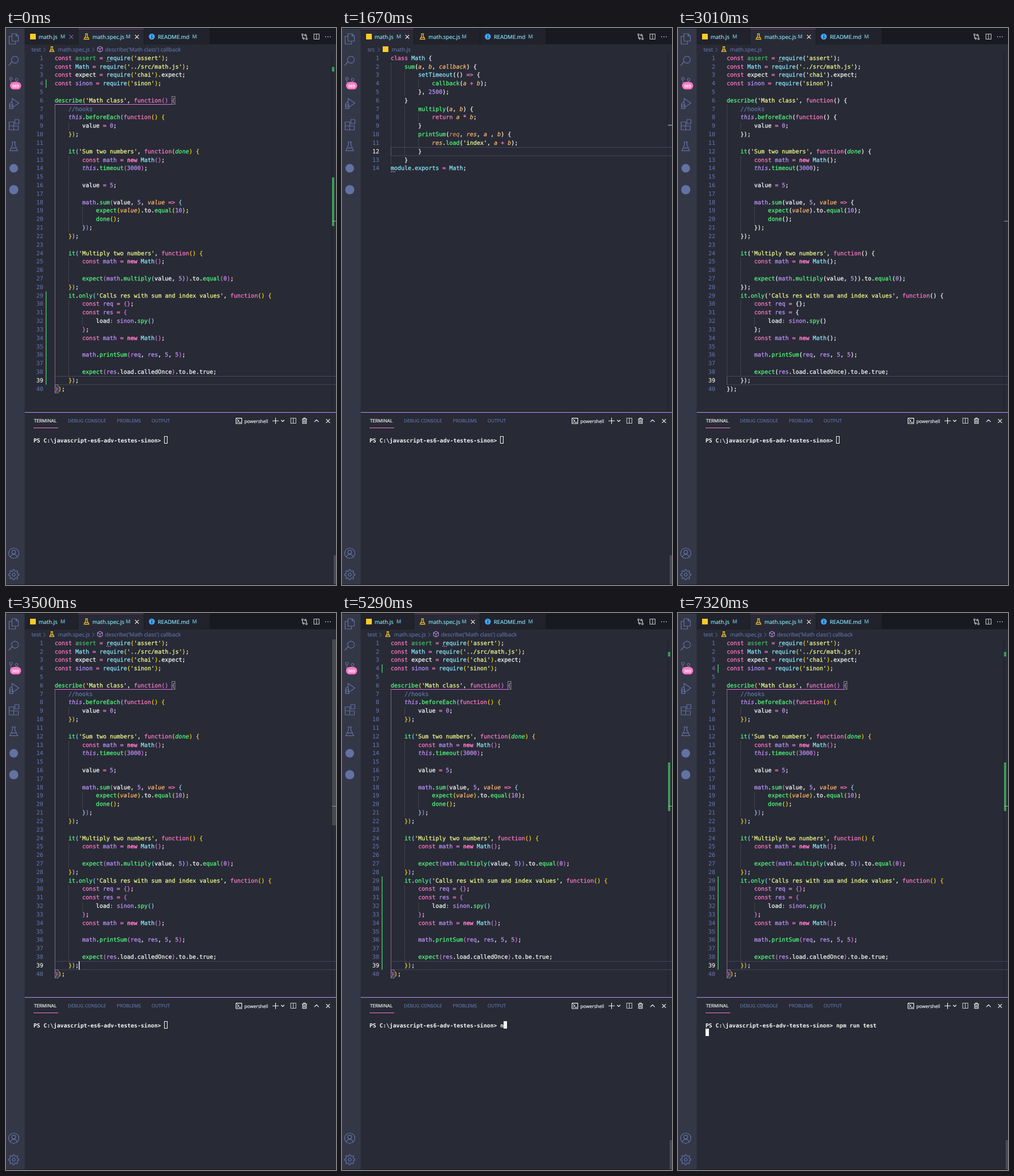
Write an HTML page that moves like this. It is 576 px wide and 973 px high and loops after 8 s.

```html
<!DOCTYPE html>
<html lang="en">
<head>
<meta charset="utf-8">
<title>Editor session</title>
<style>
html, body { margin: 0; width: 100%; height: 100%; overflow: hidden; background: #282a36; }
svg { display: block; width: 576px; height: 973px; }
text { white-space: pre; text-rendering: geometricPrecision; }
.code { font: 10px "DejaVu Sans Mono", monospace; stroke-width: .25; }
.term { font: bold 9.72px "DejaVu Sans Mono", monospace; fill: #f8f8f2; }
.ui { font: 9.5px "Open Sans", sans-serif; stroke-width: .18; }
.small { font: 8.15px "Open Sans", sans-serif; stroke-width: .18; }
.line { fill: none; stroke-width: 1.1; stroke-linecap: round; stroke-linejoin: round; }
.plain .bracket { fill: #f8f8f2 !important; stroke: #f8f8f2 !important; }
</style>
</head>
<body>
<svg id="stage" viewBox="0 0 576 973"></svg>
<script>
const C = {
  bg: '#282a36', fg: '#f8f8f2', pink: '#ff79c6', purple: '#bd93f9', green: '#50fa7b', cyan: '#8be9fd',
  orange: '#ffb86c', yellow: '#f1fa8c', muted: '#6272a4', dark: '#191a21', tab: '#21222c',
  grey: '#c5c5c5', rule: '#44475a', added: '#3f995a'
};
const BRACKETS = ['#ffd700', '#da70d6', '#87cefa'];
const LEFT = 85, TOP = 45.2, ROW = 14.82, CHAR = 6.01, PROMPT_X = 48, TERM_CHAR = 5.85;

// Markers: ~ parameter, ! callable parameter, ^ unused name
const SPEC = `const ^assert = require('assert');
const Math = require('../src/math.js');
const expect = require('chai').expect;
const sinon = require('sinon');

describe('Math class', function() {
    //hooks
    this.beforeEach(function() {
        value = 0;
    });

    it('Sum two numbers', function(!done) {
        const math = new Math();
        this.timeout(3000);

        value = 5;

        math.sum(value, 5, ~value => {
            expect(~value).to.equal(10);
            done();
        });
    });

    it('Multiply two numbers', function() {
        const math = new Math();

        expect(math.multiply(value, 5)).to.equal(0);
    });
    it.only('Calls res with sum and index values', function() {
        const req = {};
        const res = {
            load: sinon.spy()
        };
        const math = new Math();

        math.printSum(req, res, 5, 5);

        expect(res.load.calledOnce).to.be.true;
    });
});`;
const MATH = `class Math {
    sum(~a, ~b, ~callback) {
        setTimeout(() => {
            callback(~a + ~b);
        }, 2500);
    }
        multiply(~a, ~b) {
            return ~a * ~b;
        }
        printSum(^~req, ~res, ~a , ~b) {
            ~res.load('index', ~a + ~b);
        }
    }
module.exports = Math;`;

const WORDS = {};
const paintWords = (color, words) => words.split(' ').forEach(w => WORDS[w] = color);
paintWords(C.pink, 'const function class return new');
paintWords(C.cyan, 'Math require setTimeout module exports');
paintWords(C.purple, 'this math req res sinon');
paintWords(C.green, 'assert it');

const esc = s => s.replace(/&/g, '&amp;').replace(/</g, '&lt;').replace(/>/g, '&gt;');
const rect = (x, y, w, h, fill, extra = '') =>
  `<rect x="${x}" y="${y}" width="${w}" height="${h}" fill="${fill}" ${extra}/>`;
const text = (x, y, s, cls, color, extra = '') =>
  `<text x="${x}" y="${y}" class="${cls}" fill="${color}" stroke="${color}" ${extra}>${esc(s)}</text>`;
const path = (d, color, x = 0, y = 0, width = 1.1) =>
  `<path class="line" d="${d}" stroke="${color}" style="stroke-width:${width}" transform="translate(${x} ${y})"/>`;
const group = (id, body) => `<g id="${id}">${body}</g>`;
const colX = col => LEFT + col * CHAR;
const rowY = line => TOP + (line - 1) * ROW;

function highlight(source) {
  const token = /(\/\/.*)|('[^']*')|(\d+)|([~!^]*[A-Za-z]\w*)|([(){}])|(=>|[=*+:])|(\s+)|(.)/g;
  let depth = 0;
  return source.split('\n').map((line, i) => {
    let col = 0, out = '';
    for (const m of line.matchAll(token)) {
      const word = m[0].replace(/^[~!^]+/, ''), marks = m[0].slice(0, m[0].length - word.length);
      let color = C.fg, style = '';
      if (m[1]) color = C.muted;
      else if (m[2]) color = C.yellow;
      else if (m[3]) color = C.purple;
      else if (m[6]) color = C.pink;
      else if (m[5]) color = BRACKETS[('({'.includes(word) ? depth++ : --depth) % 3];
      else if (m[4]) {
        const isCall = line[m.index + m[0].length] === '(';
        color = marks.includes('~') ? C.orange : marks.includes('!') ? C.green
          : WORDS[word] || (isCall ? C.green : C.fg);
        if (/[~!]/.test(marks) || word === 'this') style += 'font-style:italic;';
        if (marks.includes('^')) style += 'fill-opacity:.65;stroke-opacity:.65;';
        if (word === 'new') style += 'font-weight:bold;';
      }
      if (!m[7]) out += `<tspan x="${colX(col)}" ${m[5] ? 'class="bracket"' : ''} ` +
        `style="fill:${color};stroke:${color};${style}">${esc(word)}</tspan>`;
      col += word.length;
    }
    return `<text class="code" y="${rowY(i + 1) + 10.5}">${out}</text>`;
  }).join('');
}

function indentGuides(source) {
  const lines = source.split('\n');
  const indent = lines.map(l => l.trim() ? l.search(/\S/) : -1);
  return indent.map((own, i) => {
    const n = own < 0 ? Math.min(indent[i - 1], indent[i + 1]) : own;
    let out = '';
    for (let c = 0; c < n; c += 4) out += rect(Math.round(colX(c)), rowY(i + 1), 1, ROW, '#fff', 'opacity=".11"');
    return out;
  }).join('');
}

function lineNumbers(source, current) {
  return source.split('\n').map((_, i) => text(65, rowY(i + 1) + 10.5, String(i + 1), 'code',
    i + 1 === current ? C.fg : C.muted, 'text-anchor="end" stroke-opacity=".5"')).join('');
}

const bracketBox = (line, col) =>
  rect(Math.round(colX(col)) + .5, Math.round(rowY(line)) + .5, 5.5, 14, 'none', 'stroke="#888"');
const hint = (x, y) => [0, 3, 6].map(d => rect(x + d, y, 1.5, 1.3, C.grey)).join('');

const editor = (source, current) =>
  rect(LEFT + .5, Math.round(rowY(current)) + .5, 500, 14.5, 'none', `stroke="${C.rule}"`) +
  indentGuides(source) + highlight(source) + lineNumbers(source, current);

const caret = (id, line, col) => group(id, rect(Math.round(colX(col)), rowY(line), 1.4, ROW, C.fg));

// Icons
const flask = (x, y, color, s = 1) => path(
  `M${-2 * s} ${-5 * s}H${2 * s}M${-1.3 * s} ${-5 * s}V${-1.5 * s}L${-4.3 * s} ${4.6 * s}H${4.3 * s}L${1.3 * s} ${-1.5 * s}V${-5 * s}M${-2.8 * s} ${1.6 * s}H${2.8 * s}`,
  color, x, y, 1.2);
const jsFile = (x, y) => rect(x - 5, y - 5, 10, 10, '#ffca28', 'rx=".8"');
const close = (x, y, color) => path('M-3-3L3 3M3-3L-3 3', color, x, y);
const chevron = x => path('M-1.7-3.4L1.7 0L-1.7 3.4', C.muted, x, 38, .9);
const cube = x => path('M0-5L4.4-2.6V2.6L0 5L-4.4 2.6V-2.6ZM-4.4-2.6L0-.2L4.4-2.6M0-.2V5', '#b180d7', x, 37);
const classIcon = x => path('M-4.5-1L-1.5-4L.5-2L-2.5 1ZM-.5-1H2M1.2 0V4H2M2-1.5L4-3L5-1.5L3.5 0ZM2 4L3.5 2.4L5 3.6L3.5 5Z', '#ee9d28', x, 37);
const split = (x, y) => path('M-4.5-4.5H4.5V4.5H-4.5ZM0-4.5V4.5', C.grey, x, y);

function activityBar() {
  const m = C.muted, icon = (d, y) => path(d, m, 13.5, y, 1.2);
  const gear = Array.from({ length: 32 }, (_, i) => {
    const a = (i - .5) * Math.PI / 16, r = i % 4 < 2 ? 9 : 6.7;
    return `${i ? 'L' : 'M'}${(r * Math.cos(a)).toFixed(1)} ${(r * Math.sin(a)).toFixed(1)}`;
  }).join('') + 'Z';
  const ring = r => `M${-r} 0a${r} ${r} 0 1 0 ${2 * r} 0a${r} ${r} 0 1 0 ${-2 * r} 0`;
  return rect(0, 0, 32.5, 973, '#343746') +
    icon('M-3-9H4L8-5V4H-3ZM4-9V-5H8M-3-4.5H-8V9H3V4', 19) +
    icon('M-3 2.5a6 6 0 1 1 2 2ZM-3 3L-8.5 9', 56) +
    icon('M-5-6a2.3 2.3 0 1 0 .1 0M5-4a2.3 2.3 0 1 0 .1 0M-5-1.4V8M5 .6Q5 4-5 4', 92) +
    rect(7, 94.3, 19.5, 13, C.pink, 'rx="6.5"') +
    text(16.8, 103.5, '989', 'small', C.fg, 'text-anchor="middle" style="font-size:7px;font-weight:600"') +
    icon('M-3-2V-9L9-1L-1 6M-8 2H-1M-8 5H-1M-8 9L-6.5 7M-1 9L-2.5 7M-7 1a2.5 3 0 0 1 5 0V6a2.5 3 0 0 1-5 0Z', 132) +
    icon('M-8-5H0V9H-8ZM-8 2H8V9H0M0 2V9M8 2V9M2-9H9V-2H2Z', 169) +
    flask(13.5, 207, m, 1.6) +
    `<circle cx="13.5" cy="245" r="7.5" fill="${m}"/><circle cx="13.5" cy="282.5" r="8" fill="${m}"/>` +
    icon(ring(9) + 'M-3.3-2a3.3 3.3 0 1 0 6.6 0a3.3 3.3 0 1 0-6.6 0M-6 6Q-4 2 0 2Q4 2 6 6', 917.5) +
    icon(gear + ring(2.6), 955);
}

const tabLabel = (x, name, mx) => text(x, 18.6, name, 'ui', C.cyan) +
  text(mx, 18.4, 'M', 'ui', C.cyan, 'opacity=".7" style="font-weight:600;font-size:9px"');
const activeTab = (x, w) => rect(x, 1, w, 28, C.bg) + rect(x, 1, w, 1, C.pink, 'opacity=".3"');

const tabBar = () =>
  rect(32.5, 0, 544, 28.5, C.dark) + rect(32.5, 1, 323, 27.5, C.tab) +
  group('tabMath', activeTab(32.5, 92.5)) + group('tabSpec', activeTab(126, 114.5)) +
  rect(125, 1, .8, 27.5, C.dark) + rect(240.5, 1, .8, 27.5, C.dark) +
  jsFile(47, 15) + tabLabel(57, 'math.js', 95) +
  flask(140.5, 15, '#ffca28') + tabLabel(151, 'math.spec.js', 209) +
  `<circle cx="254.5" cy="15" r="5.2" fill="#42a5f5"/>` + rect(253.9, 14, 1.3, 4, C.tab) + rect(253.9, 11.8, 1.3, 1.3, C.tab) +
  tabLabel(265, 'README.md', 325) +
  group('mathDim', close(114, 15.3, C.muted)) + group('mathLit', close(114, 15.3, C.fg)) +
  group('specDim', close(228.5, 15.3, C.muted)) + group('specLit', close(228.5, 15.3, C.fg)) +
  path('M-3.5-2V3H0M-1.8 1.2L0 3L-1.8 4.8M3.5 2V-3H0M1.8-4.8L0-3L1.8-1.2M-3.5-5a1.4 1.4 0 1 0 .1 0M3.5 2.2a1.4 1.4 0 1 0 .1 0', C.grey, 521, 15.3) +
  split(542, 15) + [558, 562, 566].map(x => `<circle cx="${x}" cy="15.3" r=".9" fill="${C.grey}"/>`).join('');

const crumb = (x, s) => text(x, 41.2, s, 'ui', C.muted);

const specView = () =>
  crumb(44.5, 'test') + chevron(67) + flask(80, 37, '#ffca28', .9) + crumb(91, 'math.spec.js') +
  editor(SPEC, 39) + hint(175.5, 57.5) +
  group('specSymbols', chevron(152.5) + cube(164) + crumb(173, "describe('Math class') callback") +
    path('M290 133.5H85.5', BRACKETS[1], 0, 0, 1) + path('M85.5 134V624', '#80688a', 0, 0, 1) +
    bracketBox(6, 34) + bracketBox(40, 0)) +
  caret('specCaret', 39, 7) +
  group('gitMarks', rect(69, rowY(4), 2, ROW, C.added) + rect(69, rowY(29), 2, ROW * 11, C.added) +
    rect(569, 68, 4, 8, C.added) + rect(569, 261, 4, 85, C.added)) +
  rect(569, 337, 7, 1, '#a0a1a5');

const mathView = () =>
  crumb(44.5, 'src') + chevron(64) + jsFile(76, 37) + crumb(87, 'math.js') +
  editor(MATH, 12) + hint(85.5, 250.3) +
  group('mathSymbols', chevron(126.5) + classIcon(138) + crumb(146.5, 'Math') + chevron(176.5) + cube(188.5) +
    crumb(197, 'printSum') + path('M152 59.5H85.5V223.5H115', BRACKETS[0], 0, 0, .8) +
    bracketBox(10, 34) + bracketBox(12, 8) +
    rect(573, 147, 3, 11, '#a0a1a5') + rect(573, 170, 3, 11, '#a0a1a5')) +
  caret('mathCaret', 12, 9) + rect(569, 169, 7, 1.4, '#a0a1a5');

const panelTab = (x, s, color) => text(x, 689.2, s, 'small', color);
const panel = () =>
  rect(32.5, 671, 544, 1, C.purple) +
  panelTab(49, 'TERMINAL', C.fg) + panelTab(108, 'DEBUG CONSOLE', C.muted) +
  panelTab(193.5, 'PROBLEMS', C.muted) + panelTab(254, 'OUTPUT', C.muted) + rect(48, 698, 43, 1, C.pink) +
  path('M-5-4.7H5V4.7H-5ZM-2.8-2.3L0 0L-2.8 2.3M.7 2.6H3', C.fg, 406.5, 686.3) +
  text(416, 689.6, 'powershell', 'small', C.fg) +
  path('M-5 0H5M0-5V5', C.fg, 470.5, 686.2) + path('M-2.5-1.2L0 1.3L2.5-1.2', C.fg, 483, 686.2) +
  split(501.5, 686) +
  path('M-4-3H4M-1.5-3V-4.8H1.5V-3M-3.2-3V4.7H3.2V-3M-1.1-1V3M1.1-1V3', C.fg, 521, 686) +
  path('M-3.5 1.8L0-1.7L3.5 1.8', C.fg, 542, 686) + close(562, 686.3, C.fg) +
  `<text id="prompt" class="term" x="${PROMPT_X}" y="723.6"></text>` +
  rect(0, 0, 6, 13, C.fg, 'id="solid"') +
  rect(276.5, 713.5, 5, 12, 'none', `id="hollow" stroke="${C.fg}"`) +
  rect(572, 921, 4, 51, '#4a4c55', 'id="termScroll"');

const stage = document.getElementById('stage');
stage.innerHTML = rect(0, 0, 576, 973, C.bg) +
  rect(568.6, 45, .7, 626, C.dark, 'opacity=".7"') +
  group('specView', specView()) + group('mathView', mathView()) +
  rect(569, 46, 7, 325, '#797979', 'id="editScroll"') +
  tabBar() + panel() + activityBar() + rect(0, 0, 576, 1, C.dark) + rect(0, 972, 576, 1, C.dark);

const el = {};
stage.querySelectorAll('[id]').forEach(node => el[node.id] = node);
const show = (id, on) => el[id].setAttribute('opacity', Number(on));

// Symbol data brings the outline, the scope guides and the bracket colours
function showSymbols(name, ready) {
  show(name + 'Symbols', ready);
  el[name + 'View'].classList.toggle('plain', !ready);
}

// Value of a stepped track of [time, value] pairs
const at = (track, t) => track.reduce((v, [time, next]) => t >= time ? next : v, 0);
const EDIT_SCROLL = [[390, .2], [460, .4], [660, .32], [740, .24], [820, .16], [910, .08], [990, 0],
  [3240, .2], [3310, .4], [3630, .2], [3700, 0]];
const TERM_SCROLL = [[0, 1], [660, .8], [740, .6], [820, .4], [910, .2], [990, 0], [1670, 1], [1800, 0], [3840, 1]];
const COMMAND = 'npm run test', PROMPT = 'PS C:\\javascript-es6-adv-testes-sinon> ';
const KEYS = [5290, 5350, 5480, 5750, 6180, 6320, 6460, 6510, 6650, 6720, 6920, 7050];

function draw(t) {
  const within = (from, to) => t >= from && t < to;
  const math = within(1670, 3010), spec = !math;
  show('specView', spec);
  show('mathView', math);
  show('tabSpec', spec);
  show('tabMath', math);
  show('specLit', spec);
  show('specDim', within(2280, 3010));
  show('mathLit', math);
  show('mathDim', t < 1670);
  showSymbols('spec', t < 1670 || t >= 3240);
  showSymbols('math', t >= 1940);
  show('specCaret', within(3240, 3700));
  show('mathCaret', within(1940, 2280) || within(2740, 3010));
  show('gitMarks', t < 1670 || t >= 4230);
  show('editScroll', at(EDIT_SCROLL, t));
  show('termScroll', at(TERM_SCROLL, t));

  const typed = KEYS.filter(k => t >= k).length, entered = t >= 7320;
  el.prompt.textContent = PROMPT + COMMAND.slice(0, typed);
  show('hollow', t < 3840);
  show('solid', t >= 3840);
  el.solid.setAttribute('x', Math.floor(PROMPT_X + (entered ? 0 : (PROMPT.length + typed) * TERM_CHAR)));
  el.solid.setAttribute('y', entered ? 726 : 713);
}

const start = performance.now();
function tick() {
  draw((performance.now() - start) % 8000);
  requestAnimationFrame(tick);
}
tick();
</script>
</body>
</html>
```
